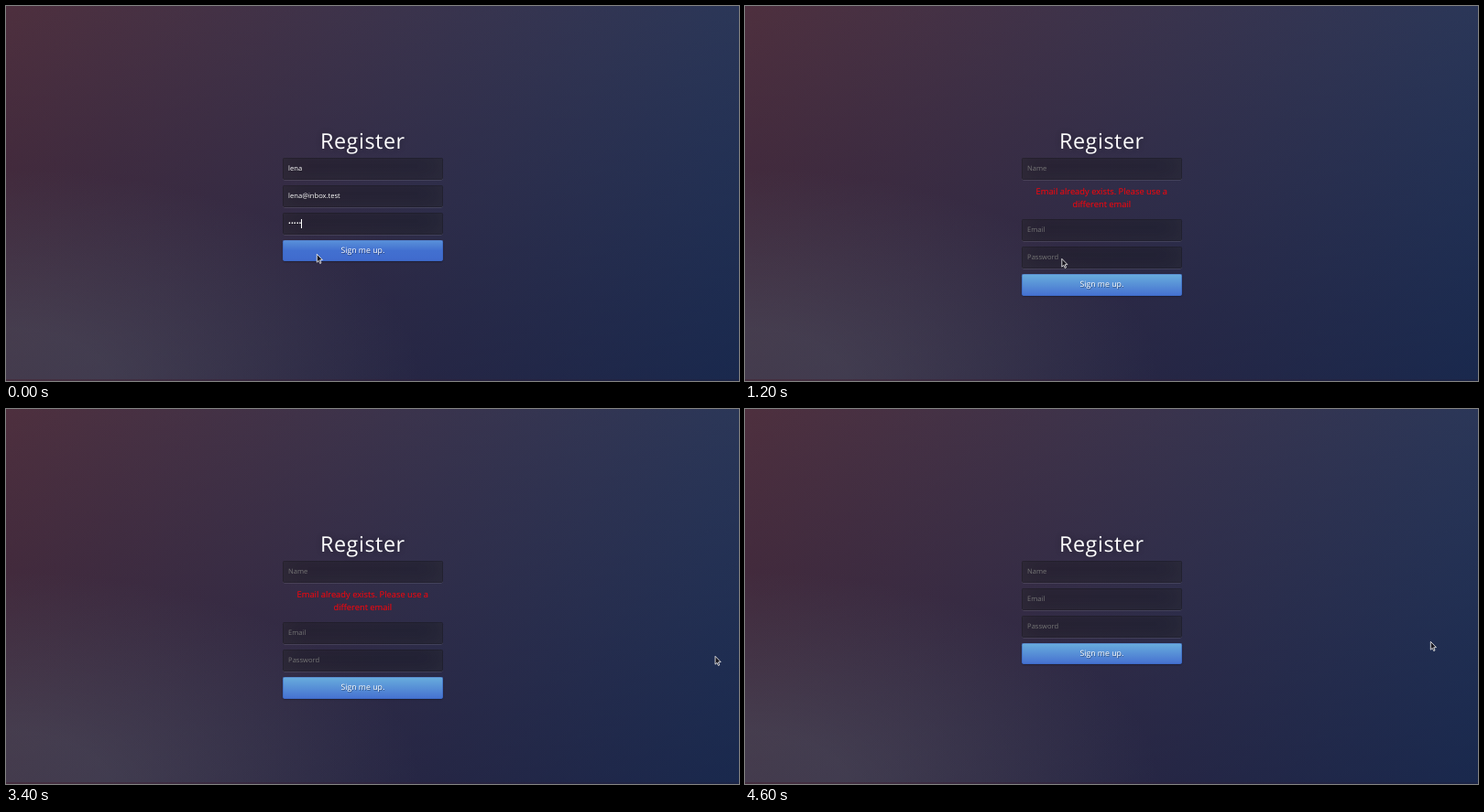
Write an HTML page that moves like this. It is 800 px wide and 410 px high and loops after 4.7 s.

```html
<!DOCTYPE html>
<html lang="en">
<head>
<meta charset="utf-8">
<title>Register</title>
<style>
html, body { margin: 0; width: 100%; height: 100%; overflow: hidden; }
#stage {
  position: absolute; left: 0; top: 0; width: 800px; height: 410px; overflow: hidden;
  font-family: "Open Sans", "Noto Sans", sans-serif; color: #fff;
  text-rendering: geometricPrecision;
  background:
    radial-gradient(ellipse farthest-corner at 0% 100%, rgba(104,122,130,.28) 10%, rgba(138,114,76,0) 40%),
    linear-gradient(to bottom, rgba(57,130,170,.25), rgba(42,50,76,.4)),
    linear-gradient(135deg, rgb(85,20,26), rgb(14,34,78));
}
#stage::after {
  content: ""; position: absolute; left: 0; bottom: 0; width: 100%; height: 2px;
  background: linear-gradient(to right, rgba(70,30,45,.45), rgba(30,30,60,.4));
}
h1, .field, .button, #error {
  position: absolute; left: 301.8px; width: 175px; margin: 0; box-sizing: border-box;
}
h1 {
  top: 131px; font-size: 23.33px; line-height: 32px; font-weight: 400;
  letter-spacing: .583px; text-align: center; text-shadow: 0 0 6px rgba(0,0,0,.3);
}
.field {
  height: 24.4px; padding-left: 6.3px; font-size: 7.58px; line-height: 24.4px; white-space: pre;
  border-radius: 2.3px; background: rgba(0,0,0,.3); text-shadow: .6px .6px .6px rgba(0,0,0,.3);
  box-shadow: inset 0 0 0 .6px rgba(0,0,0,.3), inset 0 -3px 26px rgba(100,100,100,.2),
    0 .6px .6px rgba(255,255,255,.2);
}
.field.empty { color: #757575; text-shadow: none; }
#caret {
  position: absolute; left: 20.3px; top: 7px; width: .9px; height: 10.5px; background: #fff;
}
#error {
  top: 195.7px; font-size: 9.33px; line-height: 14px; text-align: center;
  color: #e00a14; text-shadow: 0 0 .6px rgba(255,0,0,.5);
}
.button {
  height: 23.7px; border-radius: 2.4px; font-size: 8.75px; line-height: 23.7px; text-align: center;
  background: linear-gradient(#69aedd, #4570d0); text-shadow: .6px .6px .6px rgba(0,0,0,.4);
  box-shadow: inset 0 0 0 .6px #3762bc, inset 0 1.1px 0 rgba(255,255,255,.15), 0 .6px 1.2px rgba(0,0,0,.5);
}
.button.hover { background: linear-gradient(#5a92d9, #4270d0 50%, #406acd); }
.button.focus { box-shadow: inset 0 0 0 .6px #3762bc, 0 0 0 1.9px #1f58c4; }
#pointer { position: absolute; left: 0; top: 0; z-index: 2; overflow: visible; }
</style>
</head>
<body>
<div id="stage">
  <h1>Register</h1>
  <div class="field"></div>
  <div id="error">Email already exists. Please use a different email</div>
  <div class="field"></div>
  <div class="field"></div>
  <div class="button">Sign me up.</div>
  <svg id="pointer" width="8" height="12">
    <path d="M.3 .3V9.2L2.3 7.4 3.7 10.5 5 9.9 3.7 6.8 6.4 6.6Z"
      fill="#17151d" stroke="#fff" stroke-width=".8" stroke-linejoin="round"/>
  </svg>
</div>
<script>
const LOOP = 4700, STEP = 100;
const FOCUS = 200, REPLY = 600, FADE = 3530, FADE_TIME = 400;
const TOP = 165.8, PITCH = 30, ERROR_HEIGHT = 37.3;

const filled = ["lena", "lena@inbox.test", "•••••"];
const hints = ["Name", "Email", "Password"];

// time, x, y of the pointer tip
const path = [
  [0, 339, 271], [400, 340, 272], [600, 340, 272], [1200, 345.5, 276], [1900, 350, 275],
  [2200, 352, 275], [2300, 375, 275], [2400, 480, 274], [2500, 625, 272], [2600, 725, 271],
  [2700, 763, 270], [2800, 774, 270], [3100, 773, 270], [3500, 774, 270], [3700, 764, 269],
  [3900, 750, 268.5], [4100, 750, 268], [4600, 748, 254]
];

const fields = [...document.querySelectorAll(".field")];
const button = document.querySelector(".button");
const error = document.getElementById("error");
const pointer = document.getElementById("pointer");
const caret = document.createElement("i");
caret.id = "caret";

function pointerAt(t) {
  const i = path.findIndex(p => p[0] > t);
  if (i < 0) return path[path.length - 1].slice(1);
  const [t0, x0, y0] = path[i - 1], [t1, x1, y1] = path[i];
  const k = (t - t0) / (t1 - t0);
  return [x0 + (x1 - x0) * k, y0 + (y1 - y0) * k];
}

function fade(t) {
  const k = Math.min(1, Math.max(0, (t - FADE) / FADE_TIME));
  return (1 + Math.cos(Math.PI * k)) / 2;
}

function setForm(sent, focused) {
  fields.forEach((field, i) => {
    field.textContent = (sent ? hints : filled)[i];
    field.classList.toggle("empty", sent);
  });
  if (!sent && !focused) fields[2].append(caret);
  button.classList.toggle("hover", !sent);
  button.classList.toggle("focus", !sent && focused);
}

function render(t) {
  const sent = t >= REPLY;
  const open = sent && t < FADE + FADE_TIME;
  const shift = open ? ERROR_HEIGHT : 0;
  setForm(sent, t >= FOCUS);
  fields.forEach((field, i) => {
    field.style.top = TOP + PITCH * i + (i ? shift : 0) + "px";
  });
  button.style.top = TOP + PITCH * 3 + shift + "px";
  error.style.display = open ? "block" : "none";
  error.style.opacity = fade(t);
  const [x, y] = pointerAt(t);
  pointer.style.transform = `translate(${x}px, ${y}px)`;
}

const start = performance.now();
let shown = -1;
function tick() {
  const t = Math.floor((performance.now() - start) % LOOP / STEP) * STEP;
  if (t !== shown) render(shown = t);
  requestAnimationFrame(tick);
}
tick();
</script>
</body>
</html>
```
